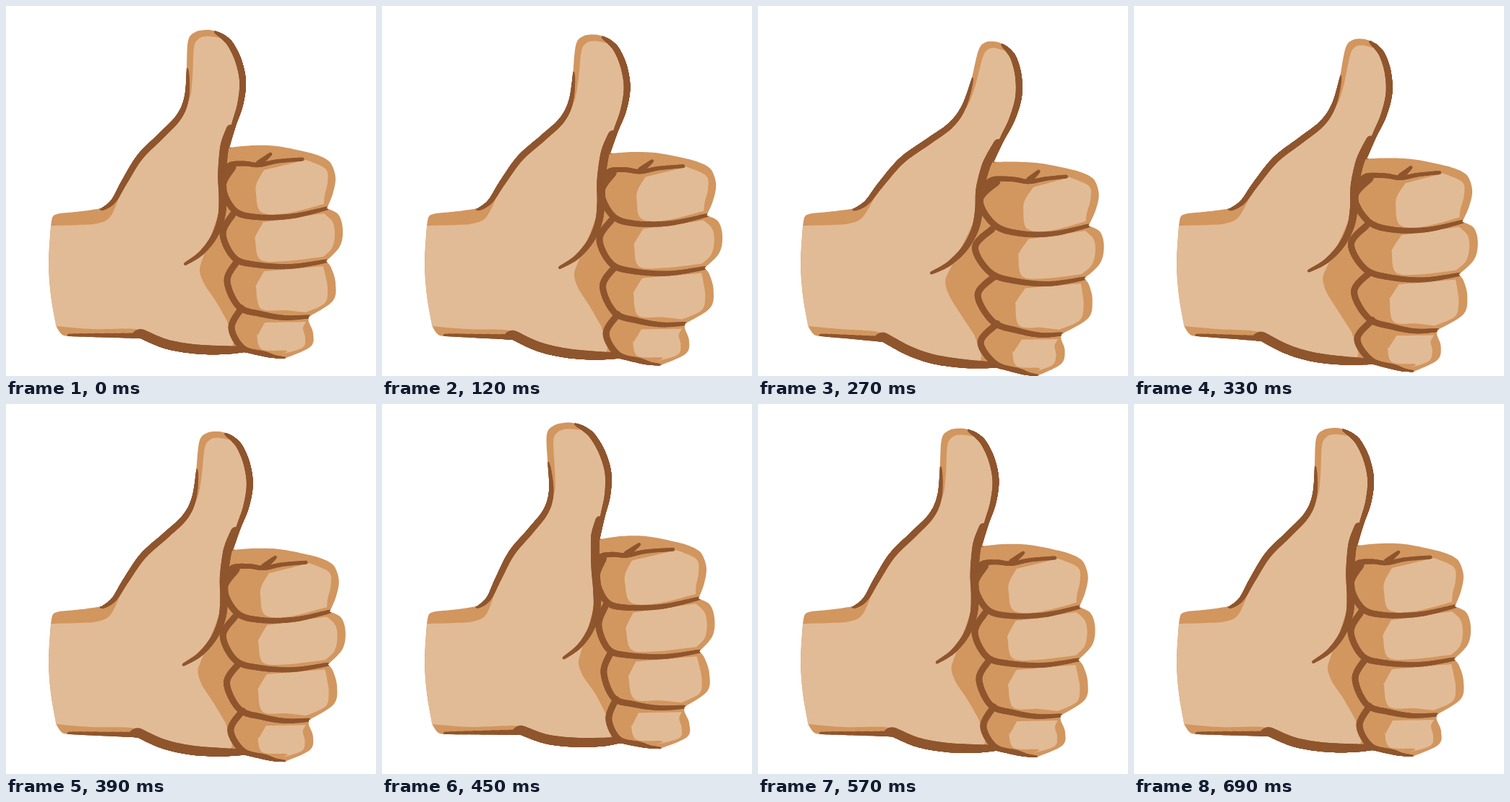
Write an HTML page with a canvas that moves like this. It is 512 by 512 pixels and loops after 1.08 s.

```html
<!DOCTYPE html>
<html lang="en">
<head>
<meta charset="utf-8">
<title>Thumbs up</title>
<style>
html, body { margin: 0; height: 100%; overflow: hidden; background: #fff; }
canvas { display: block; width: 100vw; height: 100vh; }
</style>
</head>
<body>
<canvas id="stage" width="512" height="512"></canvas>
<script>
const ctx = document.getElementById('stage').getContext('2d');
const LIGHT = '#e1bb95', MID = '#d2965f', DARK = '#8f552d';
const LOOP = 1080, STEP = 30;

const lerp = (a, b, u) => a + (b - a) * u;
const smooth = (a, b, v) => {
  const u = Math.min(1, Math.max(0, (v - a) / (b - a)));
  return u * u * (3 - 2 * u);
};
const bump = (v, mid, reach) => Math.max(0, 1 - ((v - mid) / reach) ** 2);
const run = text => text.split(' ').map(p => p.split(',').map(Number));

// Outline of the hand at rest, clockwise from the wrist.
const thumbLeft = run('132,280 146,268 160,242 182,206 212,176 236,151 247,125 250,86');
const thumbRight = run('291,35 302,40 314,51 326,75 332,105 328,137 318,166 309,196');
const heel = run('330,479 300,482 260,481 220,474 186,460');
const wristEdge = run('186,460 88,457');

// Fingers: left edge, centre, depth, right edge, upper and lower notch, nail corner.
const finger = (left, cy, depth, right, top, end, nail) => ({ left, cy, depth, right, top, end, nail });
const fingers = [
  finger(304, 250, 42, 456, [440, 210], [444, 280], [357, 227]),
  finger(304, 315, 43, 466, [444, 280], [443, 353], [356, 299]),
  finger(310, 380, 46, 456, [443, 353], [419, 430], [357, 367]),
  finger(316, 445, 37, 425, [419, 430], [385, 488], [358, 438])
];

const side = f => {
  const at = (inset, u) => [f.right - inset, lerp(f.top[1], f.end[1], u)];
  return [f.top, at(6, 0.12), at(0, 0.4), at(4, 0.72), f.end];
};

const crease = f => {
  const x = f.left + 42, y = f.cy + f.depth;
  const [ex, ey] = f.end;
  return [
    [f.left + 10, f.cy - 27], [f.left - 4, f.cy], [f.left + 12, f.cy + 0.78 * f.depth],
    [x, y], [(x + ex) / 2, (y + ey) / 2 + 0.05 * (ex - x)], f.end
  ];
};

const nail = (f, i) => {
  const low = f.cy + f.depth - 5, [nx, ny] = f.nail;
  const corner = i ? [f.top[0] - 4, f.top[1] + 7] : [415, 213];
  const end = [f.end[0] - 4, f.end[1] - 6];
  return [
    [f.nail, corner],
    [corner, [f.right - 14, lerp(corner[1], end[1], 0.2)], [f.right - 11, lerp(corner[1], end[1], 0.5)],
      [f.right - 15, lerp(corner[1], end[1], 0.8)], end],
    [end, [nx + 30, low], [nx - 4, low - 2], [nx - 11, f.cy + 10], [nx - 10, ny + 18], f.nail]
  ];
};

const body = [
  run('62,304 65,291 74,287'), run('74,287 105,284 132,280'),
  thumbLeft, run('250,86 252,48 262,36 278,33 291,35'), thumbRight,
  run('309,196 340,193 375,194 420,203 440,210'),
  ...fingers.map(side),
  run('385,488 362,486 330,479'), heel, wristEdge,
  run('88,457 78,455 71,446 69,441'), run('69,441 62,400 59,355 62,304')
];
const palm = [
  run('62,304 100,303 126,301 144,292 157,264'),
  run('157,264 186,205 240,153 254,128 258,100 260,58 266,46 276,42 290,43'),
  run('290,43 306,50 326,85 326,125 309,180 300,200'), run('300,200 298,270 271,353'),
  run('271,353 268,366 274,384 290,408 306,436'), run('306,436 312,472 260,475 190,455'),
  run('190,455 178,447 120,447 69,443'), run('69,443 62,400 59,355 62,304')
];

// Dark lines and their width along the way; edge bands are clipped to the hand.
const swell = u => 18 * Math.sin(Math.PI * u) ** 0.4;
const bands = [
  [thumbLeft, swell],
  [thumbRight, swell],
  [heel, u => 26 - 16 * (1 - u) ** 6],
  [wristEdge, u => 16 - 9 * u]
];
const lines = [
  [run('311,170 304,188 301,205 299,235 300,265 298,292 288,319 270,342 248,357'), u => 12 - 8 * u ** 3],
  [run('302,232 310,220 330,218 350,220 375,215 410,212'), u => 8 - 3 * u],
  [run('366,205 350,218'), u => 4 + 5 * u],
  ...fingers.map(f => [crease(f), u => 9 - 4 * u ** 3])
];

// Keys: time, sway of the hand, curl of thumb and knuckles, passing straight through.
const keys = [
  [0, 0, 0], [120, 0.4, 0.2, true], [270, 1, 1], [390, 0.3, 0.28, true],
  [450, -0.45, -0.45], [570, 0.04, 0.04], [690, 0, 0]
];

function slope(i, k) {
  if (!keys[i][3]) return 0;
  const a = keys[i - 1], b = keys[i + 1];
  return (b[k] - a[k]) / (b[0] - a[0]);
}

function channel(t, k) {
  const i = keys.findIndex((key, n) => n + 1 < keys.length && t < keys[n + 1][0]);
  if (i < 0) return 0;
  const a = keys[i], b = keys[i + 1];
  const span = b[0] - a[0], u = (t - a[0]) / span, v = 1 - u;
  return lerp(a[k], b[k], u * u * (3 - 2 * u)) +
    span * u * v * (slope(i, k) * v - slope(i + 1, k) * u);
}

// The hand leans from a fixed wrist, the thumb bends on, the knuckles roll.
function pose(t) {
  const sway = channel(t, 1), curl = channel(t, 2);
  return ([x, y]) => {
    const lean = 0.08 * (410 - y) + 0.053 * (x - 368) * smooth(150, 350, y);
    const thumb = 21 * smooth(210, 40, y) * (1 - (x - 275) / 140) * (x < 345 ? 1 : 0);
    const roll = smooth(190, 215, y) * (10 * bump(x, 352, 55) - 7 * bump(x, 270, 55));
    return [
      x + sway * smooth(80, 190, x) * lean + curl * (thumb + roll),
      y + sway * 24 * smooth(110, 380, x)
    ];
  };
}

function curve(points, place) {
  const pts = points.map(place), out = [pts[0]];
  for (let i = 0; i < pts.length - 1; i++) {
    const b = pts[i], c = pts[i + 1], a = pts[i - 1] || b, d = pts[i + 2] || c;
    for (let n = 1; n <= 10; n++) {
      const u = n / 10;
      out.push([0, 1].map(k => b[k] + u / 2 * (c[k] - a[k] +
        u * (2 * a[k] - 5 * b[k] + 4 * c[k] - d[k] + u * (3 * (b[k] - c[k]) + d[k] - a[k])))));
    }
  }
  return out;
}

function fill(color, runs, place) {
  ctx.fillStyle = color;
  ctx.beginPath();
  for (const r of runs) curve(r, place).forEach(p => ctx.lineTo(...p));
  ctx.closePath();
  ctx.fill();
}

function brush([points, width], place) {
  const pts = curve(points, place);
  for (let i = 1; i < pts.length; i++) {
    ctx.lineWidth = Math.max(0.5, width(i / (pts.length - 1)));
    ctx.beginPath();
    ctx.moveTo(...pts[i - 1]);
    ctx.lineTo(...pts[i]);
    ctx.stroke();
  }
}

function draw(t) {
  const place = pose(t);
  ctx.fillStyle = '#fff';
  ctx.fillRect(0, 0, 512, 512);
  ctx.strokeStyle = DARK;
  ctx.lineCap = 'round';
  ctx.save();
  fill(MID, body, place);
  ctx.clip();
  fill(LIGHT, palm, place);
  fingers.forEach((f, i) => fill(LIGHT, nail(f, i), place));
  bands.forEach(b => brush(b, place));
  lines.forEach(l => brush(l, place));
  ctx.restore();
}

const start = performance.now();
function tick() {
  const t = (performance.now() - start) % LOOP;
  draw(Math.floor(t / STEP) * STEP);
  requestAnimationFrame(tick);
}
tick();
</script>
</body>
</html>
```
